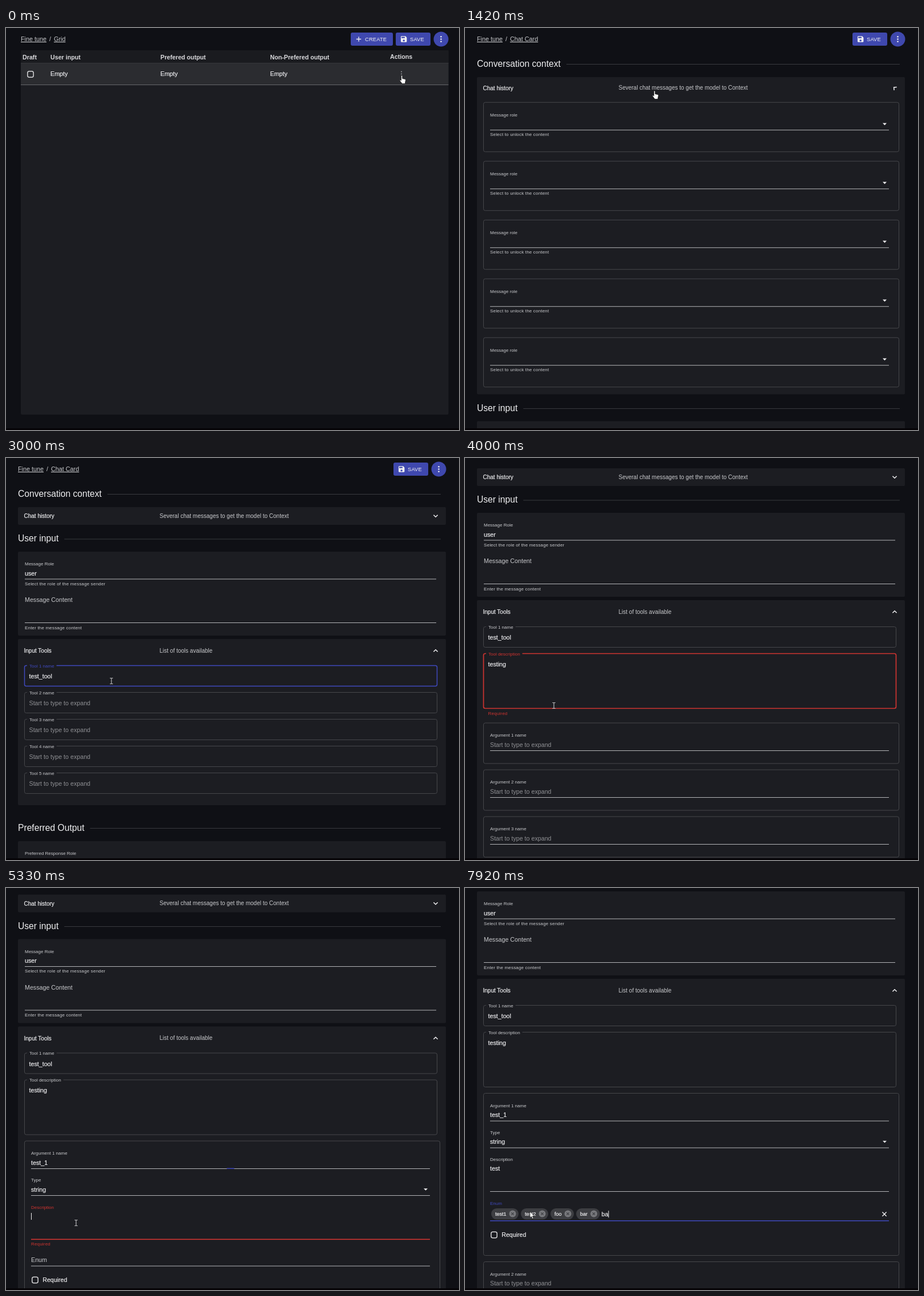
An HTML page that plays this animation: 795x704 px, repeating every 8 s.

```html
<!DOCTYPE html>
<html lang="en">
<head>
<meta charset="utf-8">
<title>Chat card editor</title>
<style>
  html, body { margin: 0; width: 100%; height: 100%; overflow: hidden; background: #0f1015; }
  svg { display: block; }
  text { font-family: "Liberation Sans", Arial, sans-serif; white-space: pre; }
</style>
</head>
<body>
<svg id="stage" width="795" height="704" viewBox="0 0 795 704"></svg>
<script>
const LOOP = 8000, STEP = 1000 / 12;
const C = {
  bg: '#0f1015', panel: '#1c1d22', white: '#f0f0f2', text: '#c9cacd', hint: '#8f9094',
  line: '#b4b5b8', border: '#46474b', rule: '#393a3f', btn: '#3f48ae', blue: '#3f49bd', red: '#cf3430'
};
const stage = document.getElementById('stage');
const pen = document.createElement('canvas').getContext('2d');
let T = 0;

// timing helpers
const clamp = v => Math.max(0, Math.min(1, v));
function ease(x) {            // cubic-bezier(.4, 0, .2, 1)
  x = clamp(x);
  let a = 0, b = 1, s = .5;
  for (let i = 0; i < 18; i++) {
    s = (a + b) / 2;
    const r = 1 - s;
    if (1.2 * r * r * s + .6 * r * s * s + s * s * s < x) a = s; else b = s;
  }
  return 3 * (1 - s) * s * s + s * s * s;
}
const run = (start, len) => ease((T - start) / len);
const on = (a, b) => T >= a && T < b;
const typed = (word, start, step) => word.slice(0, Math.max(0, Math.floor((T - start) / step) + 1));
function track(keys) {
  let i = 0;
  while (i < keys.length - 1 && T >= keys[i + 1][0]) i++;
  const a = keys[i], b = keys[i + 1] || a;
  const k = b === a ? 0 : ease((T - a[0]) / (b[0] - a[0]));
  return a.slice(1).map((v, n) => v + (b[n + 1] - v) * k);
}

// drawing helpers
function width(s, size) {
  pen.font = size + 'px "Liberation Sans", Arial, sans-serif';
  return pen.measureText(s).width;
}
const rect = (x, y, w, h, fill, r = 0) =>
  `<rect x="${x}" y="${y}" width="${w}" height="${h}" rx="${r}" fill="${fill}"/>`;
const frame = (x, y, w, h, color = C.border, sw = 1) =>
  `<rect x="${x}" y="${y}" width="${w}" height="${h}" rx="3" fill="none" stroke="${color}" stroke-width="${sw}"/>`;
const text = (s, x, y, size = 10.7, fill = C.text, extra = '') =>
  `<text x="${x}" y="${y}" font-size="${size}" fill="${fill}" ${extra}>${s}</text>`;
const strong = (s, x, y, size = 10.7) => text(s, x, y, size, C.white, `stroke="${C.white}" stroke-width=".2"`);
const label = (s, x, y, fill = C.text) => text(s, x, y, 8, fill);
const helper = (s, x, y, fill = C.text) => text(s, x, y, 8, fill, 'letter-spacing=".18"');
const path = (d, stroke, sw = 1.5, fill = 'none', move = '') =>
  `<path d="${d}" stroke="${stroke}" stroke-width="${sw}" fill="${fill}" transform="${move}"/>`;
const dot = (x, y, r, fill) => `<circle cx="${x}" cy="${y}" r="${r}" fill="${fill}"/>`;
const cross = (x, y, r, color, sw) =>
  path(`M${-r} ${-r}L${r} ${r}M${r} ${-r}L${-r} ${r}`, color, sw, 'none', `translate(${x} ${y})`);
const clip = (y, h, body) => h < .5 ? '' :
  `<svg x="21" y="${y}" width="751" height="${h}" viewBox="21 ${y} 751 ${h}">${body}</svg>`;
const arrowDown = (x, y) => path('M-3.5 -1.8H3.5L0 1.8Z', 'none', 0, C.white, `translate(${x} ${y})`);
const caret = (x, y) => rect(x, y - 9.5, 1, 12, C.white);
const checkbox = (x, y) => frame(x - 5.2, y - 5.2, 10.4, 10.4, '#d6d6d8', 1.5);

function saveButton(x) {
  return rect(x, 8, 61, 23, C.btn, 3) +
    path('M17 3H5a2 2 0 0 0-2 2v14a2 2 0 0 0 2 2h14a2 2 0 0 0 2-2V7zM12 19a3 3 0 1 1 0-6 3 3 0 0 1 0 6zM15 9H5V5h10z',
      'none', 0, C.white, `translate(${x + 7.2} 12.6) scale(.58)`) +
    text('SAVE', x + 25, 23, 9.3, C.white, 'letter-spacing=".2"') +
    dot(x + 79.5, 19.5, 13, C.btn) +
    [15.3, 19.5, 23.7].map(y => dot(x + 79.5, y, 1.3, C.white)).join('');
}
function crumbs(x, name) {
  const u = 'text-decoration="underline"';
  return text('Fine tune', x, 23, 10.8, C.text, u) + text('/', x + 50, 23, 10.8) +
    text(name, x + 58, 23, 10.8, C.text, u);
}

function gridPage() {
  const head = (s, x, y = 55) => text(s, x, y, 10.7, '#dcdcdf', 'font-weight="bold"');
  return crumbs(26, 'Grid') +
    rect(605, 8, 74, 23, C.btn, 3) + path('M614.8 19.5H623.2M619 15.3V23.7', C.white, 1.3) +
    text('CREATE', 630, 23, 9.3, C.white, 'letter-spacing=".2"') + saveButton(684) +
    rect(26, 39, 750.5, 638, C.panel, 2) + rect(26, 39, 750.5, 22, '#1a1b1f') +
    rect(26, 61, 750.5, 38, '#2b2c30') + rect(26, 61, 750.5, 1, '#36373b') + rect(26, 99, 750.5, 1, '#65666a') +
    head('Draft', 29) + head('User input', 78) + head('Prefered output', 271) +
    head('Non-Prefered output', 463.5) + head('Actions', 674, 53.5) +
    checkbox(43, 81) + [78, 271, 463.5].map(x => strong('Empty', x, 84)).join('') +
    [76.5, 80.5, 84.5].map(y => dot(694, y, 1, '#9a9b9e')).join('');
}

function heading(s, c) {
  const x = 21 + width(s, 15.65) + 10;
  return text(s, 21, c + 5.3, 15.65, C.white) + rect(x, c + .5, 763 - x, 1, C.rule);
}
// accordion: m = header progress, h = body height
function accordion(y, title, note, m, h, body) {
  const c = y + 15.5 + 5 * m;
  return rect(21, y, 751, 31 + 10 * m + h, C.panel, 2) +
    strong(title, 31.5, c + 3.5, 10) + text(note, 269.5, c + 3.3, 10) +
    path('M-3.6 -1.8L0 1.8L3.6 -1.8', C.white, 1.5, 'none', `translate(754 ${c}) rotate(${180 * m})`) +
    clip(y + 31 + 10 * m, h, body);
}
function messageCard(y, role, value, content) {
  return rect(21, y, 751, 147, C.panel, 2) +
    label(role, 33, y + 24.3) + strong(value, 33, y + 41.5) + rect(33, y + 47.5, 722, 1, C.line) +
    helper('Select the role of the message sender', 33, y + 58.7) +
    text(content, 33, y + 88) + rect(33, y + 124, 722, 1, C.line) +
    helper('Enter the message content', 33, y + 135.7);
}
function chatBoxes(y) {
  let s = '';
  for (let i = 0; i < 5; i++) {
    const b = y + 6 + 103 * i;
    s += frame(32.5, b, 729, 86.5) + label('Message role', 44, b + 25) + arrowDown(736.5, b + 38.2) +
      rect(44, b + 48, 700, 1, C.line) + helper('Select to unlock the content', 44, b + 59);
  }
  return s;
}
function outlined(y, h, name, color, labelColor, sw) {
  return frame(32.5, y, 724, h, color, sw) + rect(37, y - 2, width(name, 8) + 8, 4, C.panel) +
    label(name, 41, y + 3, labelColor);
}

const TAGS = [['test1', 5920, 6420], ['test2', 6500, 6830], ['foo', 6920, 7170], ['bar', 7250, 7500], ['baz', 7830, 9000]];
const tagsDone = () => TAGS.filter(g => T >= g[2]);

function enumField(b) {
  const done = tagsDone(), grow = done.length ? 4.5 : 0;
  if (T < 5830) return text('Enum', 44, b + 212) + rect(44, b + 218.5, 700, 1, C.line);
  let s = label('Enum', 44, b + 195.5, C.blue), x = 46;
  const cy = b + 211;
  for (const [word] of done) {
    const w = width(word, 9);
    s += rect(x, cy - 9.5, w + 28.5, 19.5, '#3d3e42', 9.7) + strong(word, x + 7, cy + 3.3, 9) +
      dot(x + w + 18, cy, 6, '#77787c') + cross(x + w + 18, cy, 2.2, '#3d3e42', 1.2);
    x += w + 32.5;
  }
  x = done.length ? x - 1 : 44;
  const cur = TAGS[done.length], word = typed(cur[0], cur[1], 80), base = b + 212.5 + grow * .6;
  s += strong(word, x, base) + caret(x + width(word, 10.7), base);
  if (done.length || word) s += cross(736, b + 209 + grow * .6, 3.6, C.white, 1.4);
  return s + rect(44, b + 218 + grow, 700, 1.5, C.blue);
}

function openArgument(b) {
  const grow = tagsDone().length ? 4.5 : 0;
  const note = typed('test', 5420, 60), error = !note, focus = on(5290, 5830);
  const tint = error ? C.red : focus ? C.blue : C.text;
  let s = frame(32.5, b, 729, 279.5 + grow) +
    label('Type', 44, b + 71) + strong('string', 44, b + 88.5) + arrowDown(736.5, b + 85) +
    rect(44, b + 95, 700, 1, C.line);
  s += T < 5290 ? text('Description', 44, b + 135.5, 10.7, tint) : label('Description', 44, b + 118.5, tint);
  s += strong(note, 44, b + 135.5) + (focus ? caret(44 + width(note, 10.7), b + 135.5) : '');
  s += rect(44, b + 171.5, 700, focus ? 1.6 : 1, tint === C.text ? C.line : tint);
  if (error) s += helper('Required', 44, b + 183, C.red);
  return s + enumField(b) + checkbox(51, b + 243.5 + grow) + strong('Required', 64.3, b + 247 + grow, 10.6);
}

function argument(n, b) {
  const value = n === 1 ? typed('test_1', 4580, 75) : '';
  const focus = n === 1 && on(4420, 5250);
  let s = n === 1 && T >= 5080 ? openArgument(b) : frame(32.5, b, 729, 71);
  s += label(`Argument ${n} name`, 44, b + 24.3, focus ? C.blue : C.text) +
    (value ? strong(value, 44, b + 41.5) : text('Start to type to expand', 44, b + 41.5, 10.7, C.hint)) +
    rect(44, b + 48, 700, 1, C.line);
  const u = n !== 1 ? 0 : on(4420, 5330) ? 700 : on(5330, 5340) ? 13 : 0;
  return s + (u ? rect(394 - u / 2, b + 47.5, u, 1.5, C.blue) : '');
}

function toolFields(y) {
  const top = y + 5.5, name = typed('test_tool', 2580, 48), focus = on(2500, 3420);
  const blank = (n, b) => outlined(b, 36, `Tool ${n} name`, C.border, C.text, 1) +
    text('Start to type to expand', 40.5, b + 22.5, 10.7, C.hint);
  let s = outlined(top, 36, 'Tool 1 name', focus ? C.blue : C.border, focus ? C.blue : C.text, focus ? 1.5 : 1) +
    (name ? strong(name, 40.5, top + 22.5) : text('Start to type to expand', 40.5, top + 22.5, 10.7, C.hint));
  if (T < 3080) return s + [2, 3, 4, 5].map(n => blank(n, top + 47 * (n - 1))).join('');

  const error = T < 4080, tint = error ? C.red : T < 4420 ? C.blue : '';
  const d = top + 47;
  s += outlined(d, 96, 'Tool description', tint || C.border, tint || C.text, on(3420, 4420) ? 1.7 : 1) +
    strong(typed('testing', 3670, 50), 40.5, d + 22.3);
  if (error) s += helper('Required', 40.5, d + 107, C.red);
  let b = d + 107 + (error ? 14.5 : 0);
  for (let n = 1; n < 5; n++) {
    s += argument(n, b);
    b += n === 1 && T >= 5080 ? 290.5 + (tagsDone().length ? 4.5 : 0) : 82;
  }
  return s;
}

function chatPage() {
  const [scroll] = track([[0, 0], [3170, 0], [3330, 68], [4080, 68], [4250, 74.5], [5580, 74.5], [5830, 158]]);
  const m = run(1000, 150) - run(1380, 150);
  const h = 527 * (run(1000, 330) - run(1390, 350));
  let y = 86, s = crumbs(21, 'Chat Card') + saveButton(680) + heading('Conversation context', 62.5);
  s += accordion(y, 'Chat history', 'Several chat messages to get the model to Context', m, h, chatBoxes(y + 31 + 10 * m));
  y += 31 + 10 * m + h;
  s += heading('User input', y + 24) + messageCard(y + 47, 'Message Role', 'user', 'Message Content');
  y += 200;
  const m2 = run(2000, 150), h2 = T >= 3080 ? 900 : 250 * run(2000, 300);
  s += accordion(y, 'Input Tools', 'List of tools available', m2, h2, toolFields(y + 31 + 10 * m2));
  y += 31 + 10 * m2 + h2;
  s += heading('Preferred Output', y + 39.5) +
    messageCard(y + 63, 'Preferred Response Role', 'assistant', 'Preferred Response Content');
  return `<g transform="translate(0 ${-scroll})">${s}</g>`;
}

function pointer() {
  const [x, y] = track([[0, 691, 83], [250, 691, 83], [750, 694, 96], [1000, 329, 110], [1500, 329, 110],
    [1920, 316, 330], [2170, 316, 330], [2500, 185, 390.5], [3170, 185, 390.5], [3420, 156, 433.5],
    [4080, 156, 433.5], [4420, 142, 486], [5080, 142, 486], [5250, 123, 586.5], [5580, 123, 586.5],
    [5830, 115.5, 568.5]]);
  const at = `translate(${x} ${y})`;
  if (T < 2330) return path('M2.5 1.2Q2.5 0 3.6 0T4.7 1.2V5.5L9.3 6.6Q10.6 7 10.4 8.5L9.2 14.5H4.2L.4 9.6Q-.4 8.4 .8 8Q1.6 7.8 2.5 9Z',
    '#111', .7, '#fff', at);
  if (T >= 6830) return path('M-1.5 -2V9L1 6.8L2.8 10.8L4.6 10L2.9 6.1H6.2Z', '#111', .7, '#fff', at);
  return path('M-2.5 -5H-.6L0 -4.5L.6 -5H2.5M0 -4.5V4.5M-2.5 5H-.6L0 4.5L.6 5H2.5', '#d8d8da', 1, 'none', at);
}

function draw(now) {
  const k = Math.floor((now % LOOP + 5) / STEP) % 96;
  T = Math.round(k * STEP / 10) * 10;
  stage.innerHTML = rect(0, 0, 795, 704, C.bg) + (T < 920 ? gridPage() : chatPage()) +
    rect(0, 701, 795, 3, '#060407') + pointer();
}

const t0 = performance.now();
let last = -1;
function tick() {
  const now = performance.now() - t0, k = Math.floor((now + 5) / STEP);
  if (k !== last) { last = k; draw(now); }
  requestAnimationFrame(tick);
}
tick();
</script>
</body>
</html>
```
